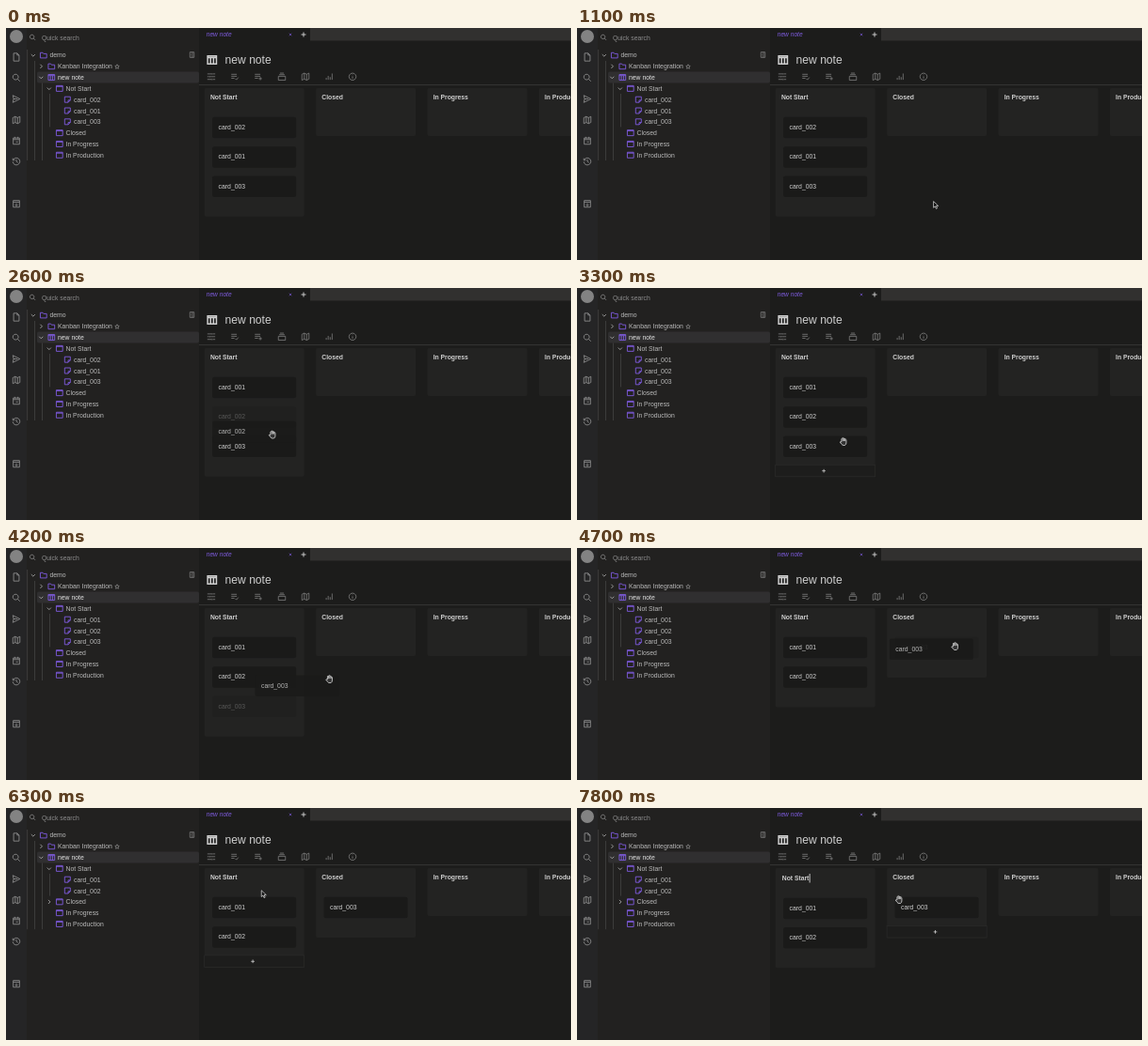
An HTML page that plays this animation: 600 px wide and 247 px high, repeating every 8 s.

```html
<!DOCTYPE html>
<html lang="en">
<head>
<meta charset="utf-8">
<title>Kanban board</title>
<style>
html, body { margin: 0; height: 100%; overflow: hidden; background: #1c1c1b; }
svg { display: block; width: 100vw; height: 100vh; }
text { font-family: "Liberation Sans", Arial, sans-serif; white-space: pre; }
</style>
</head>
<body>
<svg id="stage" viewBox="0 0 600 247"><g id="chrome"></g><g id="live"></g></svg>
<script>
const LOOP = 8000, STEP = 100;
const PURPLE = '#7f5ce0', LIGHT = '#d0d0d0', GREY = '#858585';

// Icon outlines on a 24-unit grid
const ICONS = {
  file: 'M5 2h9l5 5v15H5zM14 2v5h5',
  search: 'M10 3a7 7 0 1 0 .1 0zM15 15l6 6',
  send: 'M3 3l18 9-18 9 2-9zM5 12h9',
  map: 'M3 6l6-3 6 3 6-3v15l-6 3-6-3-6 3zM9 3v15M15 6v15',
  calendar: 'M4 5h16v16H4zM4 9h16M8 2v4M16 2v4M11 15h5',
  history: 'M4 8a9 9 0 1 1-1 5M12 7v5l4 3M3 4v5h5',
  inbox: 'M4 4h16v17H4zM4 8h16M12 11v7M9 15l3 3 3-3',
  folder: 'M3 5h7l2 3h9v12H3z',
  window: 'M3 4h18v16H3zM3 6.5h18',
  note: 'M4 4h16v10l-6 6H4zM14 20v-6h6',
  columns: 'M3 4h18v16H3zM3 7h18M9 7v13M15 7v13',
  door: 'M5 3h14v18H5zM13 3v18M9 12h1',
  star: 'M12 3l3 6 6 1-4.5 4 1 7-5.5-3-5.5 3 1-7-4.5-4 6-1z',
  sliders: 'M2 5h10M16 5h6M2 12h4M10 12h12M2 19h10M16 19h6M14 3v4M8 10v4M14 17v4',
  listCheck: 'M3 6h14M3 11h14M3 16h8M13 17l3 3 5-6',
  listPlus: 'M3 6h14M3 11h14M3 16h8M17 13v8M13 17h8',
  stack: 'M3 11h18v10H3zM5 7h14M7 3h10',
  chart: 'M5 20v-5M10 20v-10M15 20v-7M20 20V4',
  info: 'M12 3a9 9 0 1 0 .1 0zM12 11v6M12 7v1',
  down: 'M5 9l7 7 7-7',
  right: 'M9 5l7 7-7 7',
  plus: 'M12 4v16M4 12h16',
  close: 'M6 6l12 12M18 6L6 18',
  hand: 'M7 13V5q1.5-2 3 0V3.5q1.5-2 3 0V5q1.5-1.5 3 0v2q2-1.5 3 .5v8q0 4-3 6h-6q-2-1-7-8q1-2 4-.5zM10 5v6M13 5v6M16 7v4',
  arrow: 'M6 2v18l4.5-4 3 7 3-1.5-3-6.5h6z'
};

const icon = (name, x, y, size = 9, color = LIGHT, weight = 2, fill = 'none') =>
  `<path d="${ICONS[name]}" transform="translate(${x - size / 2} ${y - size / 2}) scale(${size / 24})"
    fill="${fill}" stroke="${color}" stroke-width="${weight}"/>`;
const rect = (x, y, w, h, fill, extra = '') =>
  `<rect x="${x}" y="${y}" width="${w}" height="${h}" fill="${fill}" ${extra}/>`;
// y is the middle of the lower-case letters
const text = (s, x, y, { size = 6.85, fill = LIGHT, extra = '' } = {}) =>
  `<text x="${x}" y="${y + size * .36}" font-size="${size}" fill="${fill}" ${extra}>${s}</text>`;
const guide = (x, top, bottom) => rect(x, top, .8, bottom - top, '#444443');

function drawChrome() {
  const launchers = [['file', 31], ['search', 53], ['send', 75.5], ['map', 98],
    ['calendar', 120], ['history', 142], ['inbox', 187]];
  const tools = ['sliders', 'listCheck', 'listPlus', 'stack', 'map', 'chart', 'info'];
  return rect(0, 0, 205, 247, '#222120') +
    rect(0, 0, 22, 247, '#252526') +
    rect(323, 0, 277, 13.5, '#31302f') +
    rect(205, 60.2, 395, .9, '#3a3a39') +
    '<circle cx="11" cy="9" r="7" fill="#838383"/>' +
    launchers.map(([name, y]) => icon(name, 11, y, 10, '#929292')).join('') +
    icon('search', 28.2, 10, 7.5, '#aaa') +
    text('Quick search', 38, 10.2, { fill: '#8c8c8c', size: 6.8 }) +
    text('new note', 212.7, 6.8, { size: 6.65, fill: PURPLE, extra: 'font-style="italic"' }) +
    icon('close', 302, 7, 5, PURPLE, 3) +
    icon('plus', 316, 7, 7.5, LIGHT, 3) +
    icon('columns', 218.8, 34, 12.5, LIGHT, 2.8) +
    text('new note', 232.6, 33.9, { size: 12.1 }) +
    tools.map((name, i) => icon(name, 218 + 25 * i, 51.8, 10, GREY, 1.8)).join('');
}

// Cursor stops: time, x, y
const PATH = [
  [900, 420, 220], [1600, 283, 109], [2000, 283, 109], [2500, 283, 156],
  [2900, 283, 156], [3600, 283, 169], [4000, 283, 169], [4200, 343.5, 139.5],
  [4700, 401.5, 104.5], [5200, 401.5, 104.5], [5500, 380, 102], [5800, 380, 102],
  [6300, 273.5, 91.5], [6700, 237, 74], [7100, 237, 74], [7400, 342, 97.5]
];

function cursorAt(t) {
  const i = PATH.findIndex(stop => stop[0] > t);
  if (i < 0) return PATH.at(-1).slice(1);
  if (!i) return PATH[0].slice(1);
  const [t0, x0, y0] = PATH[i - 1], [t1, x1, y1] = PATH[i];
  const k = (t - t0) / (t1 - t0);
  return [x0 + (x1 - x0) * k, y0 + (y1 - y0) * k];
}

function drawTree(t) {
  const moved = t >= 5000;
  const cards = t < 2800 ? ['card_002', 'card_001'] : ['card_001', 'card_002'];
  if (!moved) cards.push('card_003');
  const rows = [
    ['demo', 0, 'folder', 'down'],
    ['Kanban Integration', 1, 'folder', 'right'],
    ['new note', 1, 'columns', 'down'],
    ['Not Start', 2, 'window', 'down'],
    ...cards.map(name => [name, 3, 'note']),
    ['Closed', 2, 'window', moved && 'right'],
    ['In Progress', 2, 'window'],
    ['In Production', 2, 'window']
  ];
  const bottom = 23 + rows.length * 11.8;
  return rect(33, 46.5, 172, 12, '#302f30', 'rx="2"') +
    guide(22.3, 23, bottom) + guide(30, 35, bottom) + guide(38, 58.5, bottom) +
    guide(46, 70, 70 + cards.length * 11.8) +
    icon('door', 197.5, 28.5, 7.5, '#999') + icon('star', 118, 41, 6, '#bbb') +
    rows.map(([name, depth, shape, chevron], i) => {
      const x = 39.8 + depth * 8.5, y = 29 + i * 11.82;
      return icon(shape, x, y - .1, 9, PURPLE, 2.4) +
        (chevron ? icon(chevron, x - 11, y, 7, '#aaa', 3) : '') +
        text(name, x + 6.7, y, { fill: i === 2 ? '#e4e4e4' : '#bababa' });
    }).join('');
}

const drawCard = (name, x, y, opacity = 1) =>
  `<g opacity="${opacity}">` + rect(x, y, 89, 22.5, '#1a1a19', 'rx="2"') +
  text(name, x + 6.5, y + 10.6) + '</g>';

function drawBoard(t) {
  const [cx, cy] = cursorAt(t);
  const dragged = t >= 2000 && t < 2700 ? 'card_002' : t >= 4000 && t < 4800 ? 'card_003' : '';
  const editing = t >= 7200;
  const first = t < 2400 ? ['card_002', 'card_001'] : ['card_001', 'card_002'];
  const inClosed = t >= 4400;
  const columns = [
    ['Not Start', 210.7, inClosed ? first : [...first, 'card_003']],
    ['Closed', 329.1, inClosed ? ['card_003'] : []],
    ['In Progress', 447.5, []],
    ['In Production', 565.9, []]
  ];
  let overItem = false, out = '';

  columns.forEach(([title, x, cards], i) => {
    const edit = editing && !i, shift = edit ? .9 : 0;
    const height = (cards.length ? 42.6 + 31.4 * cards.length : 51) + shift;
    const bottom = 64 + height;
    out += rect(x, 64, 106, height, '#232322', 'rx="2"');
    if (edit && t < 7800) out += rect(x + 7, 69.5, 29, 10.5, '#2a5784');
    if (edit && t >= 7800) out += rect(x + 36, 70, .8, 9.5, '#eee');
    out += text(title, x + 6.2 + shift, 74 + shift / 2, { size: 6.75, extra: 'font-weight="bold"' });
    cards.forEach((name, j) =>
      out += drawCard(name, x + 8.4, 94.8 + shift + 31.4 * j, name === dragged ? .3 : 1));

    const hovered = t >= 900 && cx > x && cx < x + 106 && cy > 64 && cy < bottom;
    if (!hovered) return;
    overItem = cy < 85 || cards.some((_, j) => Math.abs(cy - 106 - 31.4 * j) < 13);
    if (!dragged && !edit) {
      out += rect(x, bottom - 12.5, 106, 12.5, '#1d1d1c', 'stroke="#2b2b2a" stroke-width=".7"') +
        icon('plus', x + 51.4, bottom - 6.1, 5.5, LIGHT, 3.5);
    }
  });

  if (dragged) {
    // The ghost trails the pointer a little
    const [gx, gy] = cursorAt(t - 50);
    const [startY, homeY] = dragged === 'card_002' ? [109, 94.8] : [169, 157.6];
    out += drawCard(dragged, 219.1 + gx - 283, homeY + gy - startY, .85);
  }
  if (t >= 900) {
    out += dragged || overItem
      ? icon('hand', cx, cy, 10, '#d8d8d8', 2, '#333')
      : icon('arrow', cx, cy, 9, '#d8d8d8', 2, '#111');
  }
  return out;
}

const live = document.getElementById('live');
document.getElementById('chrome').innerHTML = drawChrome();
let shown = -1;

function tick() {
  const t = Math.floor(performance.now() % LOOP / STEP) * STEP;
  if (t !== shown) {
    live.innerHTML = drawTree(t) + drawBoard(t);
    shown = t;
  }
  requestAnimationFrame(tick);
}
tick();
</script>
</body>
</html>
```
